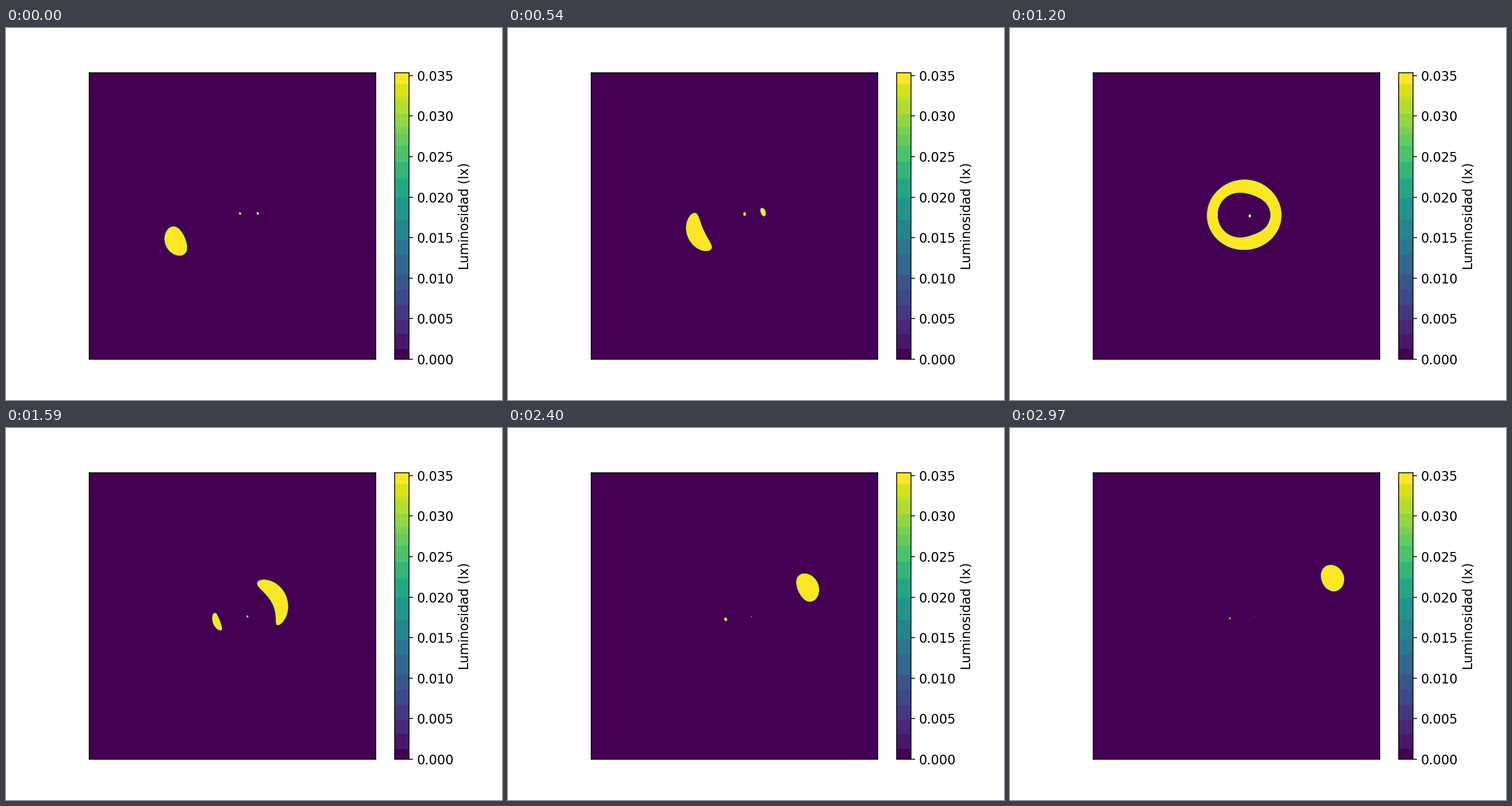
Animation, 864 px wide and 648 px high, one loop 3000 ms. Source, as a matplotlib script:

```python
import numpy as np
import matplotlib.pyplot as plt
from matplotlib.animation import FuncAnimation
from matplotlib.colors import ListedColormap

FRAMES, INTERVAL = 100, 30
HALF = 35                      # half width of the view
STEP = 2 * HALF / 1000         # size of one ray cell
RADIUS = 3                     # radius of the star
BRIGHT = 1 / (np.pi * RADIUS**2)
LENSES = [(0, 6), (5, 4)]      # position, Einstein radius
START = -10.87 - 5.06j
TRAVEL = 35 * np.exp(1j * np.pi / 8)

# Colour bar steps, as heights out of 499
EDGES = np.array([0, 18, 44, 69, 94, 121, 147, 182, 209, 242, 281, 315,
                  344, 371, 392, 404, 427, 451, 458, 479, 499]) / 499


def stepped_viridis():
    mids = (EDGES[:-1] + EDGES[1:]) / 2
    mids[0], mids[-1] = 0, 1
    band = np.searchsorted(EDGES, (np.arange(512) + 0.5) / 512) - 1
    return ListedColormap(plt.get_cmap("viridis")(mids[band]))


def trace(z):
    """Map points of the image plane back to the source plane."""
    return z - sum(r**2 / np.conj(z - pos) for pos, r in LENSES)


# Only the region the images ever reach is traced
cols = np.arange(-250, 400)
rows = np.arange(-150, 200)
x = (cols + 0.5) * STEP
y = (rows + 0.5) * STEP
source_plane = trace(x[None, :] + 1j * y[:, None])
extent = [cols[0] * STEP, (cols[-1] + 1) * STEP,
          rows[0] * STEP, (rows[-1] + 1) * STEP]


def light(frame):
    star = START + TRAVEL * frame / (FRAMES - 1)
    return np.where(np.abs(source_plane - star) < RADIUS, BRIGHT, 0.0)


plt.rcParams["font.family"] = "DejaVu Sans"
plt.rcParams["font.size"] = 12

cmap = stepped_viridis()
fig, ax = plt.subplots(figsize=(6.4, 4.8), dpi=135)
ax.set_facecolor(cmap(0))
image = ax.imshow(light(0), cmap=cmap, vmin=0, vmax=BRIGHT,
                  origin="lower", extent=extent)
ax.set(xlim=(-HALF, HALF), ylim=(-HALF, HALF), xticks=[], yticks=[])
fig.colorbar(image, ax=ax, label="Luminosidad (lx)")


def update(frame):
    image.set_data(light(frame))
    return [image]


anim = FuncAnimation(fig, update, frames=FRAMES, interval=INTERVAL,
                     repeat=True, repeat_delay=0)
plt.show()
```
